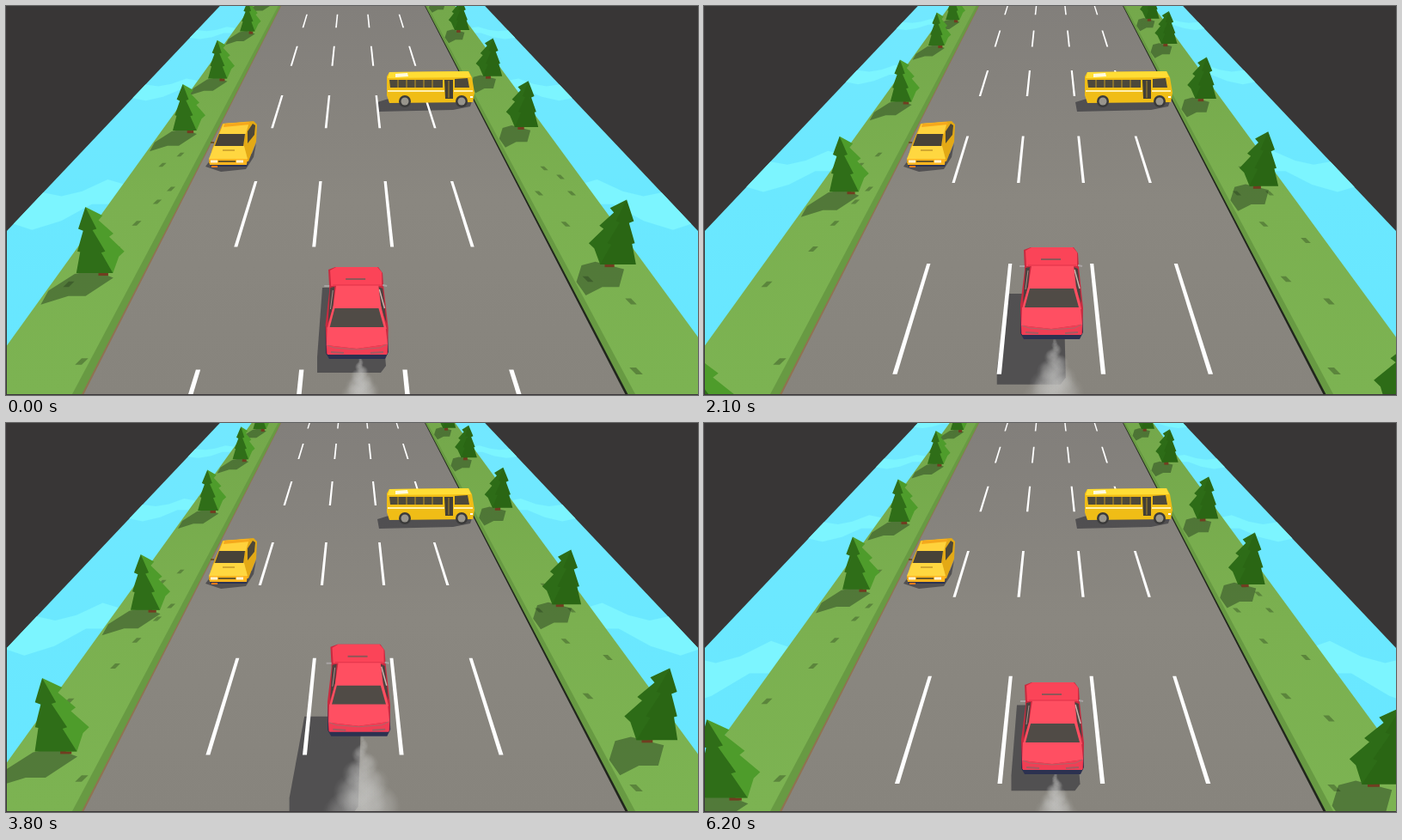
Animation, 805 px wide and 453 px high, one loop 6300 ms. Source, as an HTML page with a canvas:

```html
<!DOCTYPE html>
<html>
<head>
<meta charset="utf-8">
<style>
html, body { margin: 0; width: 805px; height: 453px; overflow: hidden; background: #383636; }
canvas { display: block; }
</style>
</head>
<body>
<canvas id="stage" width="805" height="453"></canvas>
<script>
const ctx = document.getElementById('stage').getContext('2d');
const LOOP = 6300, STEP = 100;
const times = [0, 900, 2100, 3100, 4500, 5200, 6200];
const travel = [0, 14.62, 36.25, 52.85, 78.35, 90.35, 107.4];
const carFront = [407, 357, 404, 403, 426, 507, 405];
const carRear = [408, 350, 404, 403, 429, 523, 405];
const carBottom = [411, 410, 388, 360, 376, 409, 409];

const mod = (a, n) => ((a % n) + n) % n;

// Monotone cubic through the keys
function track(values, t) {
  const slope = i => (values[i + 1] - values[i]) / (times[i + 1] - times[i]);
  const tangent = i => {
    if (i === 0) return slope(0);
    if (i === times.length - 1) return slope(i - 1);
    const a = slope(i - 1), b = slope(i);
    return a * b > 0 ? 2 * a * b / (a + b) : 0;
  };
  let i = 0;
  while (i < times.length - 2 && t > times[i + 1]) i++;
  const h = times[i + 1] - times[i], u = Math.min(1, (t - times[i]) / h), v = 1 - u;
  return values[i] * v * v * (1 + 2 * u) + values[i + 1] * u * u * (3 - 2 * u)
    + h * u * v * (v * tangent(i) - u * tangent(i + 1));
}

// Ground plane: lateral position x and depth d to the screen
const ground = (x, d) => [403 + x * 1e4 / d, 1e4 / d - 163];
const same = (x, y) => [x, y];

function poly(color, pts, map = same) {
  ctx.beginPath();
  for (let i = 0; i < pts.length; i += 2) ctx.lineTo(...map(pts[i], pts[i + 1]));
  ctx.closePath();
  ctx.fillStyle = color;
  ctx.fill();
}

function line(color, width, pts, map = same) {
  ctx.beginPath();
  for (let i = 0; i < pts.length; i += 2) ctx.lineTo(...map(pts[i], pts[i + 1]));
  ctx.strokeStyle = color;
  ctx.lineWidth = width;
  ctx.stroke();
}

const strip = (color, a, b) => poly(color, [a, 63, b, 63, b, 16, a, 16], ground);

function shade(...stops) {
  const g = ctx.createLinearGradient(0, 0, 0, 453);
  stops.forEach((c, i) => g.addColorStop(i / (stops.length - 1), c));
  return g;
}
const roadFill = shade('#827f7b', '#8a8780', '#87847d');
const grassFill = shade('#74a84b', '#7bb050', '#7cb352');
const waterFill = shade('#72e8ff', '#6be8ff', '#66e6ff');

const spots = [88, 414, 73, 324, 127, 283, 152, 253, 176, 228, 192, 213, 182, 185, 203, 173,
  733, 425, 677, 318, 727, 344, 700, 273, 651, 254, 620, 218, 658, 218, 626, 189, 645, 199];

function scenery(dist) {
  ctx.fillStyle = '#383636';
  ctx.fillRect(0, 0, 805, 453);
  for (const side of [-1, 1]) {
    strip(waterFill, .7 * side, .946 * side);
    for (let k = 1; k < 6; k++) {
      const d = mod(27 - dist, 13) + 13 * k;
      poly('#7cf5ff', [.72, d, .78, d + .4, .83, d - .6, .88, d - 1, .946, d - .7,
        .946, d - 3, .88, d - 3.4, .82, d - 2.8, .77, d - 1.6, .72, d - 1.6],
        (x, y) => ground(x * side, y));
    }
  }
  strip(grassFill, -.72, -.5);
  strip(grassFill, .5, .733);
  strip('#689a43', -.53, -.5);
  strip('#689a43', .5, .535);
  strip('#8f7350', -.512, -.5);
  strip('#20251c', .5, .521);
  strip(roadFill, -.508, .516);
  for (let i = 0; i < spots.length; i += 2) {
    const x = spots[i], y = spots[i + 1], r = (y + 163) / 150, lean = x < 403 ? r : -r;
    poly('#5b853c', [x - r + lean, y - r, x + r + lean, y - r, x + r - lean, y + r, x - r - lean, y + r]);
  }
}

function dashes(dist) {
  const phase = mod(27.25 - dist, 10.2);
  for (let k = 1; k < 7; k++) {
    const d = phase + 10.2 * k;
    for (const x of [-.306, -.101, .104, .315])
      poly('#fff', [x - .0045, d, x + .0045, d, x + .0045, d - 4.7, x - .0045, d - 4.7], ground);
  }
}

function tree(side, d) {
  if (side < 0) d -= .45;
  const x = side < 0 ? -.61 : .643, s = 1e4 / d;
  const [bx, by] = ground(x, d);
  poly('rgba(25,45,25,.42)', [-.07, 0, -.03, .2, .03, -.2, -.01, -1.1, -.05, -1.1, -.1, -1.5, -.105, -.85],
    (a, b) => ground(x + a, d + b * d / 21.5));
  ctx.fillStyle = '#713d20';
  ctx.fillRect(bx - .012 * s, by - 3, .024 * s, 5);
  const height = s * (.2 - .00008 * s), lean = s * s * .0000925;
  const place = (a, f) => [bx - side * (a * s / 469 - lean * f), by - 1 - f * height];
  poly(side < 0 ? '#4e9c2b' : '#2d6c17', [0, 1, 17, .87, 11, .8, 24, .6, 18, .55, 31, .33, 23, .25, 11, 0, 0, 0], place);
  poly(side < 0 ? '#2f6e18' : '#2a6614', [0, 1, -15, .67, -10, .64, -23, .33, -20, .32, -31, 0, 11, 0, 4, .31, 9, .33, 1, .65, 6, .67], place);
}

function forest(dist) {
  [21.5, 32.8, 40.7, 52.1, 63]
    .map(d => mod(d - dist - 11, 51.5) + 11)
    .flatMap(d => [d, d + 51.5])
    .filter(d => d < 72)
    .sort((a, b) => b - a)
    .forEach(d => { tree(-1, d); tree(1, d); });
}

const shadow = 'rgba(45,45,52,.6)';

function parkedShadows() {
  poly(shadow, [232, 187, 240, 176, 286, 172, 291, 160, 288, 176, 279, 190, 250, 193]);
  poly(shadow, [432, 112, 445, 108, 543, 108, 540, 117, 520, 121, 434, 123]);
}

function taxi() {
  poly('#2c3352', [236, 180, 282, 180, 280, 187, 238, 187]);
  poly('#e3a916', [252, 137, 288, 134, 292, 138, 291, 158, 282, 181, 236, 183, 240, 166]);
  poly('#ffd23c', [253, 137, 283, 135, 279, 149, 248, 149]);
  poly('#f5a81c', [254, 137, 283, 135, 284, 138, 253, 141]);
  poly('#474238', [248, 149, 278, 149, 276, 163, 243, 163]);
  poly('#4d4738', [281, 146, 287, 137, 290, 139, 289, 150, 281, 160]);
  poly('#ffd740', [242, 163, 277, 163, 281, 178, 236, 178]);
  poly('#ffb51f', [236, 178, 281, 178, 280, 185, 237, 185]);
  line('#fff3cf', 3, [238, 181, 246, 181]);
  line('#fff3cf', 3, [268, 181, 276, 181]);
  line('#6d5a29', 2, [247, 181, 267, 181]);
  line('#a5791c', 1, [252, 168, 266, 168]);
  line('#ff7a1c', 2, [239, 187, 246, 187]);
  line('#6d552a', 2, [238, 159, 242, 159]);
}

function bus() {
  poly('#f0bd16', [443, 82, 446, 77, 538, 76, 542, 83, 545, 101, 543, 112, 446, 113, 443, 104]);
  poly('#ffdd35', [446, 77, 538, 76, 541, 83, 444, 84]);
  poly('#fffbe0', [453, 79, 467, 78, 468, 82, 453, 83]);
  poly('#4d493b', [446, 86, 508, 86, 508, 95, 447, 95]);
  for (let x = 456; x < 506; x += 10) line('#c49b22', 1, [x, 86, x, 95]);
  poly('#4d493b', [522, 85, 537, 84, 539, 95, 522, 95]);
  poly('#423f36', [510, 86, 520, 86, 520, 108, 511, 108]);
  line('#aa8926', 1, [515, 87, 515, 107]);
  line('#fff0ae', 2, [444, 99, 510, 99]);
  line('#fff0ae', 2, [521, 99, 543, 99]);
  for (const x of [464, 530]) {
    for (const [r, color] of [[7, '#3a3a3a'], [4.5, '#98958d']]) {
      ctx.fillStyle = color;
      ctx.beginPath();
      ctx.arc(x, 111, r, 0, 7);
      ctx.fill();
    }
  }
  line('#fff', 2, [540, 106, 543, 106]);
}

function carShadow(rear, bottom) {
  const lift = Math.max(0, 411 - bottom);
  const left = rear - 46 - .75 * lift, top = 328 + .3 * lift, low = 427 + .6 * lift;
  const inset = 6 + .25 * lift;
  poly(shadow, [left + inset, top, left + inset + 66, top, left + 80, low - 8, left + 74, low, left, low, left, low - 18]);
}

function smoke(t, front, rear, bottom) {
  const room = 460 - bottom;
  for (let i = 0; i < 26; i++) {
    const life = mod(i / 26 + t / 1000, 1), dist = life * room;
    const r = 2 + dist * .3;
    const x = rear + 4 + (rear - front) * dist * .03 + Math.sin(i * 7.3) * dist * .22;
    const y = bottom + dist;
    const g = ctx.createRadialGradient(x, y, 0, x, y, r);
    g.addColorStop(0, 'rgba(205,205,203,.24)');
    g.addColorStop(.6, 'rgba(200,200,198,.15)');
    g.addColorStop(1, 'rgba(200,200,198,0)');
    ctx.fillStyle = g;
    ctx.fillRect(x - r, y - r, 2 * r, 2 * r);
  }
}

function car(front, rear, bottom) {
  const at = (x, y) => [rear + x + (rear - front) * y / 107, bottom + y];
  const part = (color, ...pts) => poly(color, pts, at);
  const stroke = (color, width, ...pts) => line(color, width, pts, at);
  part('#2c3150', -36, -38, 36, -38, 37, -8, 33, 0, -32, 0, -36, -7);
  part('#c92b40', -32, -104, -24, -107, 26, -107, 31, -100, 32, -84, 37, -36, 36, -6, -35, -6, -36, -40, -31, -80);
  part('#fb4458', -30, -103, -23, -107, 25, -107, 30, -101, 30, -85, -29, -85);
  part('#4d4240', -30, -83, -25, -84, -27, -60, -33, -42);
  part('#4d4240', 26, -84, 31, -82, 35, -42, 28, -60);
  stroke('#c9b5ae', 1.5, 27, -81, 33, -59);
  stroke('#a98f8c', 1, -27, -80, -30, -58);
  part('#ff4f61', -23, -86, 26, -86, 29, -60, -27, -60);
  stroke('#e03349', 1, -27, -86, 29, -86);
  stroke('#8f5658', 2, -12, -93, 11, -93);
  part('#ff4f61', -27, -61, 29, -61, 35, -35, -34, -35);
  part('#504b46', -25, -59, 26, -59, 32, -37, -31, -37);
  part('#ff4f62', -34, -37, 34, -37, 36, -17, 0, -12, -35, -16);
  part('#f03f55', -35, -16, 0, -12, 36, -17, 35, -5, -34, -5);
  stroke('#ab6669', 1, -34, -16, -26, -13, 0, -11, 27, -13, 35, -17);
  stroke('#a45a61', 2, -30, -8, -15, -7);
  stroke('#a45a61', 2, 16, -7, 31, -8);
  stroke('#a7a3a3', 2, -37, -85, -31, -85);
  stroke('#a7a3a3', 2, 31, -86, 36, -85);
}

function draw(t) {
  const dist = track(travel, t), front = track(carFront, t);
  const rear = track(carRear, t), bottom = track(carBottom, t);
  scenery(dist);
  parkedShadows();
  carShadow(rear, bottom);
  dashes(dist);
  forest(dist);
  taxi();
  bus();
  smoke(t, front, rear, bottom);
  car(front, rear, bottom);
  ctx.fillStyle = '#3b373a';
  ctx.fillRect(0, 0, 1, 453);
  ctx.fillRect(0, 452, 805, 1);
}

const start = performance.now();
function frame() {
  const t = (performance.now() - start) % LOOP;
  draw(Math.floor(t / STEP) * STEP);
  requestAnimationFrame(frame);
}
frame();
</script>
</body>
</html>
```
